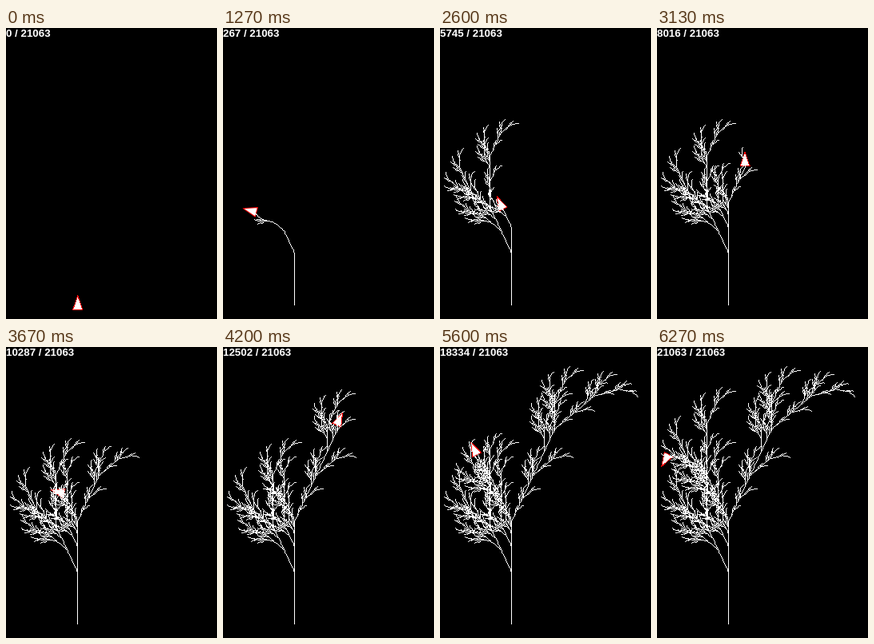
An HTML page with a canvas for the animation above (7600 ms loop, 264 by 364 pixels).

```html
<!DOCTYPE html>
<html>
<head>
<meta charset="utf-8">
<style>
html, body { margin: 0; width: 100%; height: 100%; overflow: hidden; background: #000; }
svg, canvas { position: absolute; left: 0; top: 0; }
text { font: bold 13.33px "Liberation Sans", Arial, sans-serif; fill: #fff; }
</style>
</head>
<body>
<svg width="264" height="364">
  <polygon id="turtle" points="0,-11.55 6,5.77 -6,5.77" fill="#fff" stroke="#f00"
    stroke-linejoin="round" shape-rendering="crispEdges"/>
  <text id="count" x="0" y="11"></text>
</svg>
<canvas id="plant" width="264" height="364"></canvas>
<script>
const LOOP = 7600, FRAME = 1000 / 15, STEP = 2, ANGLE = 25;
const RULES = { X: 'F+[[X]-X]-F[-FX]+X', F: 'FF' };
// [frame, symbols read]
const PACE = [[18, 0], [27, 2405], [39, 5745], [55, 10287], [63, 12502], [75, 15877], [94, 21063]];

const turtle = document.getElementById('turtle');
const count = document.getElementById('count');
const ctx = document.getElementById('plant').getContext('2d');
ctx.fillStyle = '#fff';

let word = 'X';
for (let i = 0; i < 6; i++) word = word.replace(/[XF]/g, c => RULES[c]);
word = word.replace(/X/g, '');

// Turtle pose after each symbol
function walk() {
  let pose = { x: 89.26, y: 345.9, turn: 0 };
  const poses = [pose], stack = [];
  for (const c of word) {
    let { x, y, turn } = pose;
    if (c === '[') stack.push(pose);
    else if (c === ']') ({ x, y, turn } = stack.pop());
    else if (c === '+') turn -= ANGLE;
    else if (c === '-') turn += ANGLE;
    else {
      const a = turn * Math.PI / 180;
      x += STEP * Math.sin(a);
      y -= STEP * Math.cos(a);
    }
    poses.push(pose = { x, y, turn });
  }
  return poses;
}
const poses = walk();

function symbolsAt(frame) {
  if (frame <= PACE[0][0]) return 0;
  for (let i = 1; i < PACE.length; i++) {
    const [f0, n0] = PACE[i - 1], [f1, n1] = PACE[i];
    if (frame <= f1) return Math.round(n0 + (n1 - n0) * (frame - f0) / (f1 - f0));
  }
  return word.length;
}

// Hard-edged line between the nearest whole pixels
function line(p, q) {
  const x = Math.round(p.x), y = Math.round(p.y);
  const dx = Math.round(q.x) - x, dy = Math.round(q.y) - y;
  const steps = Math.max(Math.abs(dx), Math.abs(dy));
  for (let i = 0; i <= steps; i++) {
    const k = i / (steps || 1);
    ctx.fillRect(x + Math.trunc(dx * k), y + Math.trunc(dy * k), 1, 1);
  }
}

function draw(n) {
  ctx.clearRect(0, 0, 264, 364);
  for (let i = 0; i < n; i++) {
    if (word[i] === 'F') line(poses[i], poses[i + 1]);
  }
  const { x, y, turn } = poses[n];
  turtle.setAttribute('transform', `translate(${x + 0.5} ${y + 0.5}) rotate(${turn})`);
  count.textContent = `${n} / ${word.length}`;
}

let shown = -1;
const start = performance.now();
function tick() {
  const t = (performance.now() - start) % LOOP;
  const n = symbolsAt(Math.floor((t + 5) / FRAME));
  if (n !== shown) draw(shown = n);
  requestAnimationFrame(tick);
}
tick();
</script>
</body>
</html>
```
